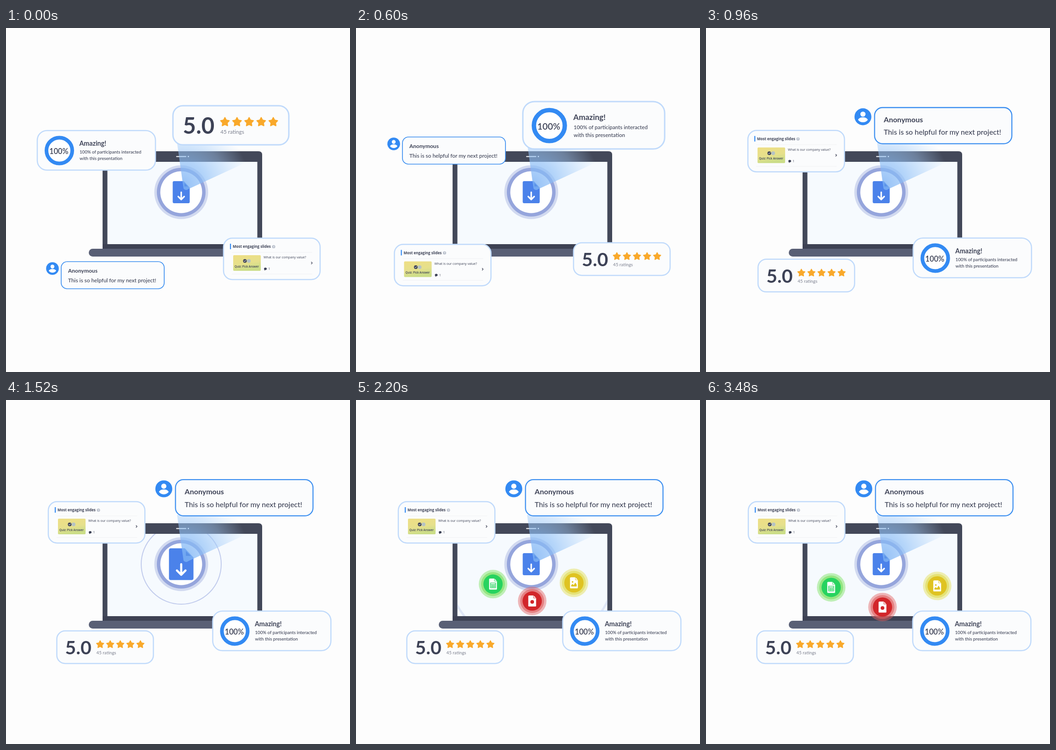
An HTML page that plays this animation: 748 by 748 pixels, repeating every 3.96 s.

```html
<!DOCTYPE html>
<html lang="en">
<head>
<meta charset="utf-8">
<title>Presentation report</title>
<style>
  html, body { margin: 0; width: 100%; height: 100%; overflow: hidden; background: #fdfdfd; }
  svg { display: block; width: 100vw; height: 100vh; }
  text { font-family: Lato, "Open Sans", sans-serif; fill: #3d4256; }
  .slides text { font-family: "Open Sans", "Noto Sans", sans-serif; }
  .card { fill: #fbfcfd; stroke: #c0dafb; stroke-width: 2.5; }
  .white { fill: #fff; }
  .line { fill: none; stroke-linecap: round; stroke-linejoin: round; }
</style>
</head>
<body>
<svg viewBox="0 0 748 748">
  <defs>
    <clipPath id="screen"><rect x="220.500" y="291" width="326" height="179"/></clipPath>
    <radialGradient id="beam" gradientUnits="userSpaceOnUse" cx="384" cy="340" r="145">
      <stop offset="0" stop-color="#79b0f3" stop-opacity=".8"/>
      <stop offset=".35" stop-color="#8fc0f7" stop-opacity=".65"/>
      <stop offset=".65" stop-color="#a6cefa" stop-opacity=".42"/>
      <stop offset="1" stop-color="#b5d8fb" stop-opacity="0"/>
    </radialGradient>
    <linearGradient id="thumb" x2=".3" y2="1">
      <stop offset="0" stop-color="#eede84"/>
      <stop offset=".6" stop-color="#e6e08c"/>
      <stop offset="1" stop-color="#cbdd88"/>
    </linearGradient>
    <path id="page" d="M-6.500-12H3L8.500-6.500V10.500Q8.500 12 7 12H-7Q-8.500 12-8.500 10.500V-10.500Q-8.500-12-6.500-12Z"/>
  </defs>

  <g id="laptop">
    <path d="M210 480V276Q210 268 218 268H549Q557 268 557 276V480Z" fill="#434859"/>
    <rect x="220.500" y="291" width="326" height="179" fill="#f6fafe"/>
    <rect x="210" y="470" width="347" height="10" fill="#3d4153"/>
    <rect x="180" y="480" width="407" height="17" rx="8.500" fill="#595f75"/>
    <path class="line" d="M371 279.500H391" stroke="#fff" stroke-width="2.200"/>
    <circle class="white" cx="396.500" cy="279.500" r="1.400"/>
  </g>

  <g clip-path="url(#screen)">
    <circle id="ripple" class="line" cx="381" cy="357" stroke="#b9c5ea"/>
  </g>

  <g transform="translate(381 357)">
    <circle r="58.500" fill="#d1d9f0"/>
    <circle r="53" fill="#95a5dc"/>
    <circle class="white" r="45.500"/>
    <g id="download">
      <path d="M-15.500-24H5.500L18.500-10V21Q18.500 24 15.500 24H-15.500Q-18.500 24-18.500 21V-21Q-18.500-24-15.500-24Z" fill="#4b82ea"/>
      <path class="line" d="M0 0V15.500M-6.500 9.500L0 16L6.500 9.500" stroke="#fff" stroke-width="3.200"/>
    </g>
  </g>
  <path d="M372 250L386 349Q390 355 397 350L525 291L610 250Z" fill="url(#beam)"/>
  <g transform="translate(381 357)">
    <path id="fold" d="M7-20V-12.500H14.500Z" fill="#5b93e8"/>
  </g>

  <g id="files"></g>

  <g id="slides" class="slides">
    <rect class="card" x="-105" y="-45" width="210" height="90" rx="19"/>
    <rect x="-91" y="-33" width="2.200" height="12" fill="#338af3"/>
    <text x="-85" y="-24" font-size="8" font-weight="700">Most engaging slides</text>
    <circle cx="4" cy="-26.500" r="3.600" fill="#bcc3ce"/>
    <text x="4" y="-24.400" font-size="5.500" font-weight="700" text-anchor="middle" style="fill:#fff">?</text>
    <path d="M-87-14H88M-87 33H88" stroke="#f0f1f3"/>
    <rect x="-84" y="-8" width="60" height="34" rx="2" fill="url(#thumb)"/>
    <circle cx="-50" cy="4.500" r="4" fill="#b6c3c4"/>
    <circle cx="-58.500" cy="4.500" r="4" fill="#3d4256"/>
    <path class="line" d="M-60.500 4.500L-59 6L-56.500 3" stroke="#fff"/>
    <text x="-54.500" y="18.500" font-size="6.200" font-weight="600" text-anchor="middle">Quiz: Pick Answer</text>
    <text x="-18" y="-1" font-size="7.100">What is our company value?</text>
    <ellipse cx="-14" cy="21.500" rx="3" ry="2.600" fill="#3d4256"/>
    <path d="M-16 22V25.500L-13 23.500Z" fill="#3d4256"/>
    <text x="-7.500" y="24.300" font-size="6.500">1</text>
    <path class="line" d="M86 7L88 9L86 11" stroke="#3d4256" stroke-width="1.300"/>
  </g>

  <g id="rating">
    <rect class="card" x="-105" y="-35.500" width="210" height="71" rx="18"/>
    <text x="-87" y="15.700" font-size="41" font-weight="700">5.0</text>
    <g id="stars" fill="#f9a92b" stroke="#f9a92b" stroke-width="1.800" stroke-linejoin="round"></g>
    <text x="-19" y="15.400" font-size="9.800" style="fill:#7b7f8e">45 ratings</text>
  </g>

  <g id="score">
    <rect class="card" x="-128.500" y="-43" width="257" height="86" rx="21"/>
    <circle class="white" cx="-80.500" cy=".5" r="28" stroke="#338af3" stroke-width="8"/>
    <text x="-81.500" y="8.300" font-size="16.300" font-weight="600" text-anchor="middle">100%</text>
    <text x="-37" y="-10" font-size="14.200" font-weight="700">Amazing!</text>
    <text x="-36.500" y="6.700" font-size="9.700" font-weight="500">100% of participants interacted</text>
    <text x="-36.500" y="21" font-size="9.700" font-weight="500">with this presentation</text>
  </g>

  <g id="comment">
    <circle cx="-114.500" cy="-14.500" r="13.800" fill="#338af3"/>
    <circle class="white" cx="-114.500" cy="-18.800" r="4.200"/>
    <path class="white" d="M-122.500-9.500Q-120.500-13.500-114.500-13.500T-106.500-9.500Q-109.500-5.500-114.500-5.500T-122.500-9.500Z"/>
    <rect class="card" x="-95.500" y="-29.500" width="224" height="59" rx="13" style="stroke:#3c8ff0;stroke-width:1.700"/>
    <text x="-80.500" y="-5.500" font-size="12" font-weight="700">Anonymous</text>
    <text x="-80.500" y="15" font-size="11.850" font-weight="500">This is so helpful for my next project!</text>
  </g>
</svg>

<script>
const LOOP = 3960, TICK = 40;
const $ = id => document.getElementById(id);
const clamp = v => Math.min(1, Math.max(0, v));
const mix = (a, b, s) => a + (b - a) * s;
const easeInOut = s => s < .5 ? 4 * s ** 3 : 1 - 4 * (1 - s) ** 3;
const phase = (t, from, to) => clamp((t - from) / (to - from));

// stops: x, y, scale; arcs: outward bulge of the path between two stops
const cards = {
  rating:  { stops: [[489, 211.5, 1.2], [578, 502.5, 1], [215.5, 537.5, 1]], arcs: [[85, 0], [0, 38]] },
  score:   { stops: [[196.5, 266, 1], [517, 211.5, 1.2], [578, 502, 1]],     arcs: [[0, -25], [55, 0]] },
  comment: { stops: [[215.5, 537.5, 1], [196.5, 266.5, 1], [496, 212.5, 1.335]], arcs: [[-40, 0], [0, -20]] },
  slides:  { stops: [[578, 502, 1], [188.5, 515.5, 1], [197, 266, 1]],       arcs: [[0, 36], [-30, 0]] }
};

const files = [
  { dx: -109.5, dy: 50.5, color: '#27d35f', halo: '#7be05e',
    mark: c => `<path d="M-5.500-2.500H5.500V8H-5.500ZM-5.500 1H5.500M-5.500 4.500H5.500M-1.800 1V8M1.900 1V8" fill="none" stroke="${c}" stroke-width="1.300"/>` },
  { dx: 122.5, dy: 47.3, color: '#dfc322', halo: '#e2dc50',
    mark: c => `<circle cx="-3" cy="-2" r="1.800" fill="${c}"/><path d="M-6 8V5L-3 2.500L-.5 5L3-.5L6 4V8Z" fill="${c}"/>` },
  { dx: 2.8, dy: 93.3, color: '#d2262a', halo: '#e2605f',
    mark: c => `<circle cy="2" r="4" fill="${c}"/>` }
];

$('files').innerHTML = files.map(({ color, halo, mark }) => `<g>
  <circle r="31" fill="${halo}" opacity=".45"/>
  <circle r="26" fill="${halo}" opacity=".6"/>
  <circle r="21" fill="${color}"/>
  <use href="#page" class="white"/>
  <path d="M3-12V-6.500H8.500" fill="none" stroke="${color}" stroke-width=".9"/>
  ${mark(color)}</g>`).join('');
const fileNodes = [...$('files').children];

const starPoints = (cx, cy) => Array.from({ length: 10 }, (_, i) => {
  const r = i % 2 ? 4.3 : 8.2, a = (i / 5 - .5) * Math.PI;
  return `${(cx + r * Math.cos(a)).toFixed(2)},${(cy + r * Math.sin(a)).toFixed(2)}`;
}).join(' ');
$('stars').innerHTML = [0, 1, 2, 3, 4]
  .map(i => `<polygon points="${starPoints(-10.8 + 21.9 * i, -5.8)}"/>`).join('');

function place(node, x, y, scale) {
  node.setAttribute('transform', `translate(${x} ${y}) scale(${scale})`);
}

function drawCards(t) {
  const leg = t < 600 ? 0 : 1;
  const s = easeInOut(leg ? phase(t, 600, 1010) : phase(t, 200, 600));
  const lift = 4 * s * (1 - s);
  for (const [id, { stops, arcs }] of Object.entries(cards)) {
    const [x, y, scale] = stops[leg].map((v, i) => mix(v, stops[leg + 1][i], s) + lift * (arcs[leg][i] || 0));
    place($(id), x, y, scale);
  }
}

function drawPulse(t) {
  const grow = 1 + .44 * Math.sin(Math.PI * phase(t, 1280, 1760)) ** 2;
  place($('download'), 0, 0, grow);
  place($('fold'), 0, 0, grow);
  const ripple = $('ripple'), r = 87 + (t - 1520) * .143;
  ripple.setAttribute('r', Math.max(0, r));
  ripple.setAttribute('stroke-width', mix(1.6, 5, phase(t, 1400, 2300)));
  ripple.setAttribute('opacity', t < 1280 || t > 2460 ? 0 : mix(.85, .3, phase(t, 1520, 2300)));
}

function drawFiles(t) {
  const age = Math.max(0, t - 1700), shown = phase(t, 1700, 1900);
  files.forEach(({ dx, dy }, i) => {
    const x = 381 + dx * (1 - Math.exp(-age / 352));
    const y = 357 + dy * (1 - Math.exp(-age / 256));
    place(fileNodes[i], x, y, mix(.5, 1, shown));
    fileNodes[i].setAttribute('opacity', shown);
  });
}

function draw(now) {
  const t = Math.min(3480, Math.floor(now % LOOP / TICK) * TICK);
  drawCards(t);
  drawPulse(t);
  drawFiles(t);
}

const start = performance.now();
function loop() {
  draw(performance.now() - start);
  requestAnimationFrame(loop);
}
loop();
</script>
</body>
</html>
```
